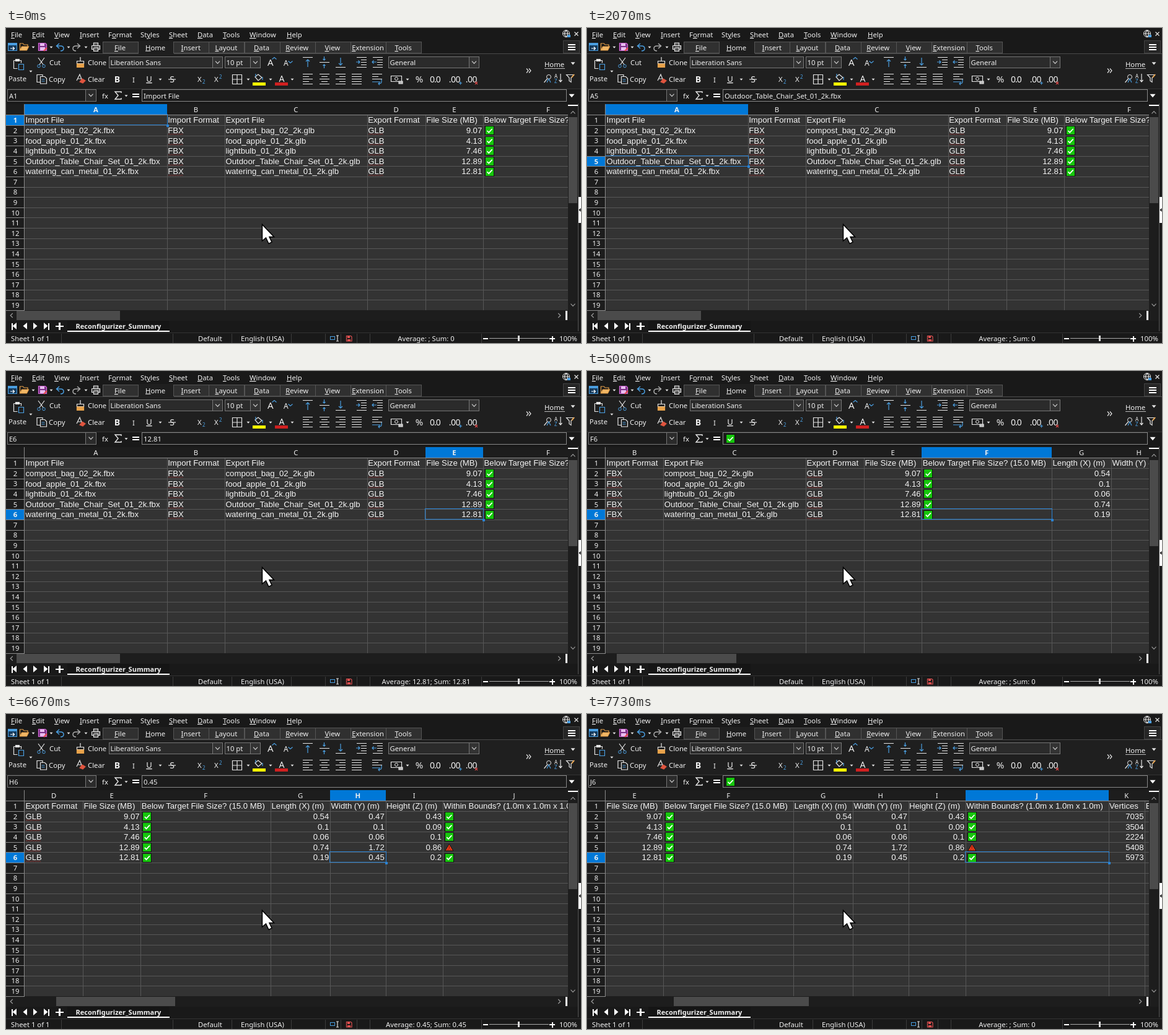
Write an HTML page that moves like this. It is 928x509 px and loops after 8 s.

```html
<!DOCTYPE html>
<html lang="en">
<head>
<meta charset="utf-8">
<title>Spreadsheet</title>
<style>
html, body { margin: 0; width: 100%; height: 100%; overflow: hidden; background: #191919; }
svg { display: block; width: 928px; height: 509px; }
text { font: 11.3px "Noto Sans", "Open Sans", sans-serif; fill: #f0f0f0; white-space: pre; }
.cell { font: 13.2px "Liberation Sans", Arial, sans-serif; fill: #f4f4f4; }
.bold { font-weight: 700; }
.mid { text-anchor: middle; }
.end { text-anchor: end; }
rect, line { shape-rendering: crispEdges; }
</style>
</head>
<body>
<svg id="stage" viewBox="0 0 928 509">
  <defs><clipPath id="clip"><rect x="30" y="122" width="877" height="334"/></clipPath></defs>
  <g id="chrome"></g>
  <g id="sheet"></g>
  <g id="pointer"></g>
</svg>
<script>
const BLUE = '#0078d7', SKY = '#4a9ee0', INK = '#e4e4e4', GRID = '#575757', EDGE = '#8a8a8a', BG = '#191919';

// Drawing helpers, each returns SVG markup
const rect = (x, y, w, h, fill, stroke = 'none') =>
  `<rect x="${x}" y="${y}" width="${w}" height="${h}" fill="${fill}" stroke="${stroke}"/>`;
const path = (d, stroke = INK, fill = 'none', w = 1.2) =>
  `<path d="${d}" stroke="${stroke}" fill="${fill}" stroke-width="${w}"/>`;
const line = (x1, y1, x2, y2, stroke) =>
  `<line x1="${x1}" y1="${y1}" x2="${x2}" y2="${y2}" stroke="${stroke}"/>`;
const text = (x, y, s, cls = '', style = '') =>
  `<text x="${x}" y="${y}" class="${cls}" style="${style}">${s}</text>`;
const mnemonic = s => s.replace(/_(.)/, '<tspan text-decoration="underline">$1</tspan>');
const drop = (x, y, r = 2.5, fill = INK) => path(`M${x - r} ${y - r / 2}h${2 * r}l${-r} ${r * 1.2}z`, 'none', fill);
const chevron = (x, y, dx, dy, c = '#999') => dx
  ? path(`M${x - dx} ${y - 3.5}L${x + dx} ${y}L${x - dx} ${y + 3.5}`, c)
  : path(`M${x - 3.5} ${y - dy}L${x} ${y + dy}L${x + 3.5} ${y - dy}`, c);
const bars = (x, y, widths, align) => widths.map((w, i) =>
  rect(x + (16 - w) * align, y + i * 4, w, 1.3, INK)).join('');
const combo = (x, w, label) => rect(x + .5, 46.5, w, 18, '#2b2b2b', '#777') +
  rect(x + w - 15.5, 46.5, 16, 18, '#333', '#777') + chevron(x + w - 7.5, 55.5, 0, 1.8, '#ccc') + text(x + 2.5, 59.5, label);

function tick(x, y) {
  return `<rect x="${x - 7}" y="${y - 7}" width="14" height="14" fill="#16c60c" stroke="#111"/>` +
    path(`M${x - 4} ${y + .3}l2.7 2.8l5.4 -5.8`, '#fff', 'none', 1.7);
}
const warn = (x, y) => path(`M${x} ${y - 5.5}L${x + 6.5} ${y + 5.5}h-13z`, '#111', '#f03a17', 1) +
  path(`M${x} ${y - 2}v4M${x - 2.5} ${y + 3.4}h1.4M${x + 1.2} ${y + 3.4}h1.4`, '#7a1c0c');

function menus() {
  const items = [[8, '_File'], [42, '_Edit'], [78, '_View'], [119, '_Insert'], [165, 'F_ormat'], [217, 'St_yles'],
    [263, '_Sheet'], [309, '_Data'], [350, '_Tools'], [393, '_Window'], [453, '_Help']];
  const tabs = ['_File', '_Home', '_Insert', '_Layout', '_Data', '_Review', '_View', '_Extension', '_Tools'];
  let s = items.map(([x, t]) => text(x, 15, mnemonic(t))).join('');
  s += rect(0, 41, 928, 58, '#1f1f1f') + line(0, 41.5, 928, 41.5, '#4a4a4a');
  tabs.forEach((t, i) => {
    const x = 156.5 + i * 57.15, on = i == 1;
    s += rect(x, on ? 20.5 : 22.5, 57, on ? 22 : 18, on ? '#1f1f1f' : '#303030', on ? 'none' : '#555') +
      text(x + 27.5, on ? 35.5 : 36, mnemonic(t), 'mid');
  });
  s += rect(899.5, 20.5, 26, 20, '#262626', '#444') + [26, 30, 34].map(y => rect(907, y, 12, 1.6, '#fff')).join('');
  // Globe and close
  s += `<circle cx="904" cy="9" r="5.5" fill="none" stroke="${INK}"/>` + path('M898.5 9h11M904 3.5q-5 5.5 0 11q5 -5.5 0 -11') +
    rect(906, 11, 5, 4, SKY) + path('M917.5 6.5l6 6m0 -6l-6 6');
  return s;
}

function quickBar() {
  return rect(3.5, 24.5, 14, 12, '#153a5c', SKY) + rect(4, 25, 14, 3, SKY) + path('M7 33h6m-2 -2.5l2.5 2.5l-2.5 2.5', '#fff') +
    path('M22.5 36V25h5l1.5 2h6v3', '#e8a24a') + path('M22.5 36l3 -6h11l-3 6z', '#e8a24a', '#f0b766') +
    path('M52.5 24.5h11l2 2v10h-13z', '#d56ad8', '#7a2f86') + rect(55, 25, 7, 4, '#e9bdf0') + rect(55, 31, 8, 5, '#e9bdf0') + path('M61 37l5 -5', '#f05050', 'none', 2) +
    path('M86 25l-4.5 4l4.5 4M82 29h6q5 0 5 4t-5 4', SKY, 'none', 1.5) +
    path('M115 25l4.5 4l-4.5 4M119 29h-6q-5 0 -5 4t5 4', '#aaa', 'none', 1.5) +
    path('M141.5 28v-4h7v4M138.5 28.5h13v6h-2.500M138.500 28.500v6h2.500M141.500 32h7v5.500h-7z', INK, '#555') +
    [44, 73, 101, 129].map(x => drop(x, 31)).join('');
}

function toolbar() {
  let s = '';
  // Clipboard
  s += path('M12.500 52.500h12v4M12.500 52.500v13h6') + rect(15, 50, 7, 4, INK) + path('M20.500 58.500h8v9h-8z', SKY, '#1f1f1f') +
    text(4, 86, 'Paste') + drop(40, 70) +
    path('M52 48l8 11M62 48l-8 11') + `<circle cx="53" cy="61.500" r="2.300" fill="none" stroke="${SKY}"/><circle cx="61" cy="61.500" r="2.300" fill="none" stroke="${SKY}"/>` +
    text(70, 60, 'Cut') + path('M58 87.500h-8v-12h9v3', INK) + path('M55.500 78.500h7l3 3v8.500h-10z', INK, '#1f1f1f') + path('M57.500 83h5M57.500 86h5', SKY) +
    text(69, 87, 'Copy') +
    path('M120 47v6M114.500 53.500h11v4h-11z', INK) + path('M114.500 57.500v6h11v-6', '#e8a24a', '#e8a24a') + text(132, 60, 'Clone') +
    path('M114 85l5 -10l4 10M115.500 82h6', INK) + path('M119 87l4 -5l5 3l-4 4z', '#e0553f', '#e0553f') + text(132, 87, 'Clear');
  s += combo(166, 183, 'Liberation Sans') + combo(353, 57, '10 pt') + combo(617, 146, 'General');
  // Character formatting
  s += text(422, 61, 'A', '', 'font-size:15px') + chevron(433, 49, 0, -1.5, SKY) + text(448, 61, 'A', '', 'font-size:12px') + chevron(459, 55, 0, 1.5, SKY) +
    text(179.500, 88, 'B', 'bold mid', 'font-size:14px') + text(206, 88, 'I', 'mid', 'font:italic 14px "Noto Serif",serif') +
    text(231, 87, 'U', 'mid', 'font-size:13px;text-decoration:underline') + drop(249, 83) +
    text(268, 88, 'S', 'mid', 'font-size:14px') + path('M262 83h12') +
    text(309, 87, 'X') + text(317, 90, '2', '', 'font-size:8px;fill:' + SKY) + text(336, 87, 'X') + text(344, 82, '2', '', 'font-size:8px;fill:' + SKY) +
    path('M365.500 75.500h15v15h-15zM373 75.500v15M365.500 83h15') +
    path('M402 79l5 -4l6 5l-6 5z', INK) + path('M403 74v5M414 79v5', SKY) + rect(398, 88, 21, 4.500, '#ffff00') +
    text(445, 87, 'A', 'mid', 'font-size:14px') + rect(434, 88, 21, 4.500, '#d02020') +
    [391, 427, 462, 648].map(x => drop(x, 83)).join('');
  // Alignment
  s += bars(479, 47, [16], 0) + path('M487 63v-12m-3 3l3 -3l3 3', SKY) + bars(482, 51, [0], 0) +
    bars(506, 55, [16], 0) + path('M513.500 46v6m-2 -2l2 2l2 -2M513.500 65v-6m-2 2l2 -2l2 2', SKY) +
    bars(532, 63, [16], 0) + path('M540 48v12m-3 -3l3 3l3 -3', SKY) +
    bars(566, 47, [16, 9, 9, 9, 16], 1) + path('M565 55h6m-2.500 -2.500l2.500 2.500l-2.500 2.500', SKY) +
    bars(592, 47, [16, 9, 9, 9, 16], 1) + path('M598 55h-7m2.500 -2.500l-2.500 2.500l2.500 2.500', SKY) +
    bars(479, 74, [16, 10, 16, 10, 16], 0) + bars(506, 74, [16, 10, 16, 10, 16], .5) + bars(532, 74, [16, 10, 16, 10, 16], 1) +
    bars(558, 74, [16, 16, 16, 16, 16], 0) + bars(591, 74, [16, 10, 16], 0) + path('M591 87h13m2 -4v4q0 3 -5 3m2 -2l-2 2l2 2', SKY);
  // Number formats
  s += path('M621.500 77.500h17v9h-17z') + `<circle cx="630" cy="82" r="2.500" fill="none" stroke="${INK}"/>` + path('M634 86h6v4h-6z', INK, '#bbb') +
    text(667, 88, '%', 'mid', 'font-size:15px') + text(692.500, 88, '0.0', 'mid', 'font-size:14px;letter-spacing:-1px') +
    text(724, 88, '.00', 'mid', 'font-size:14px;letter-spacing:-.5px') + text(751, 88, '.00', 'mid', 'font-size:14px;letter-spacing:-.5px') +
    path('M731 89h5m-2.500 -2.500v5', SKY) + path('M757 87l4 4m0 -4l-4 4', '#e04848') +
    path('M840 65.500l3 3.500l-3 3.500M844 65.500l3 3.500l-3 3.500') + text(869, 63, 'Home') + rect(869, 65, 33, 1, '#bbb') + drop(915, 57, 3.500);
  // Find, sort, filter
  s += `<circle cx="876" cy="79" r="3.500" fill="none" stroke="${INK}"/>` + path('M873.500 82l-5 6') + path('M873 88l3 -6l3 6', SKY) +
    text(885, 81, 'A', '', 'font-size:8px') + text(885, 89, 'Z', '', 'font-size:8px;fill:' + SKY) + path('M895 74v13m-2.500 -3l2.500 3l2.500 -3') +
    path('M904.500 75.500h12l-4.500 5v7l-3 -2v-5z') + path('M913 80l4 -5', '#e8a24a', 'none', 2);
  // Formula bar
  s += line(0, 98.500, 928, 98.500, '#333') + rect(2.500, 99.500, 143, 19, '#1c1c1c', '#777') + rect(128.500, 99.500, 17, 19, '#2b2b2b', '#777') + chevron(137, 108.500, 0, 1.800, '#ccc') +
    text(155, 114, 'fx', '', `font:italic 15px "Noto Serif",serif;fill:${SKY}`) + path('M186 105v-2h-10l5 6l-5 6h10v-2', INK, 'none', 1.400) + drop(194, 109.500) +
    rect(204, 106, 11, 1.800, '#fff') + rect(204, 110, 11, 1.800, '#fff') +
    rect(219.500, 99.500, 685, 19, '#1c1c1c', '#888') + drop(913, 109, 4.500, '#fff');
  return s;
}

function bottomBar() {
  let s = rect(0, 456, 924, 17, '#1d1d1d') + chevron(9, 464.500, -1.800) + chevron(893, 464.500, 1.800) + rect(903, 457, 3, 15, '#fff');
  // Vertical scroll bar and side handle
  s += rect(907, 122, 17, 334, '#1d1d1d') + rect(907, 124, 16, 2, '#fff') + chevron(915, 136.500, 0, -1.800) +
    chevron(915, 447.500, 0, 1.800) + rect(908, 144, 14, 139, '#4b4b4b') + line(923.500, 122, 923.500, 490, '#555') +
    rect(924, 273, 4, 42, '#fff') + path('M927.500 291v6l-3 -3z', 'none', '#000');
  // Sheet tabs
  const y = 481.5;
  s += rect(9, y - 5, 1.800, 11, '#fff') + [[17, -1], [34, -1], [44, 1], [61, 1]].map(([x, d]) =>
    path(`M${x} ${y - 5.500}v11l${6.500 * d} -5.500z`, 'none', '#fff')).join('') + rect(68, y - 5, 1.800, 11, '#fff') +
    rect(80, y - 1, 13, 2.500, '#fff') + rect(85, y - 6, 2.500, 12, '#fff') +
    rect(99, 473, 165, 17, '#151515') + text(181.500, 486, 'Reconfigurizer_Summary', 'bold mid', 'font-size:11px') + rect(99, 489, 165, 2, '#fff');
  // Status bar
  s += line(0, 492.500, 928, 492.500, '#333') + [89, 269, 364, 460, 515, 540, 566, 587, 767].map(x => line(x + .5, 494, x + .5, 509, '#3c3c3c')).join('') +
    text(8, 506, 'Sheet 1 of 1') + text(310, 506, 'Default') + text(379, 506, 'English (USA)') +
    rect(523.500, 498.500, 7, 5, 'none', SKY) + path('M533 497h4M535 497v9M533 506h4') +
    path('M549.500 497.500h7l1.500 1.500v7h-8.500z', '#e05050') + rect(551, 498, 4, 3, '#e05050') + rect(551, 503, 5, 3, '#e05050') +
    rect(770, 501, 8, 2, '#fff') + rect(780, 501, 96, 1, '#aaa') + rect(826, 497, 3, 9, '#ddd') +
    rect(877, 501, 9, 2, '#fff') + rect(880.500, 497.500, 2, 9, '#fff') + text(893, 506, '100%');
  return s;
}

// Sheet contents
const models = ['compost_bag_02_2k', 'food_apple_01_2k', 'lightbulb_01_2k', 'Outdoor_Table_Chair_Set_01_2k', 'watering_can_metal_01_2k'];
const rep = v => Array(5).fill(v);
const cols = [
  [229.7, 'Import File', models.map(m => m + '.fbx')],
  [93.3, 'Import Format', rep('FBX')],
  [229.7, 'Export File', models.map(m => m + '.glb')],
  [94, 'Export Format', rep('GLB')],
  [93.3, 'File Size (MB)', ['9.07', '4.13', '7.46', '12.89', '12.81']],
  [209.7, 'Below Target File Size? (15.0 MB)', rep(tick)],
  [96, 'Length (X) (m)', ['0.54', '0.1', '0.06', '0.74', '0.19']],
  [89.5, 'Width (Y) (m)', ['0.47', '0.1', '0.06', '1.72', '0.45']],
  [92.3, 'Height (Z) (m)', ['0.43', '0.09', '0.1', '0.86', '0.2']],
  [230.7, 'Within Bounds? (1.0m x 1.0m x 1.0m)', [tick, tick, tick, warn, tick]],
  [58.7, 'Vertices', ['7035', '3504', '2224', '5408', '5973']],
  [60, 'Edges', rep('')]
];
const rowY = r => 140.4 + 16.6 * (r - 1);   // top of row r
const px = v => Math.round(v) + .5;

// Timelines: [start ms, value]
const picks = [[0, 'A1'], [870, 'A2'], [1330, 'A3'], [1670, 'A4'], [2070, 'A5'], [2470, 'A6'], [3130, 'B6'], [3400, 'C6'],
  [3800, 'D6'], [4200, 'E6'], [4670, 'F6'], [5330, 'G6'], [6070, 'G6'], [6200, 'H6'], [6730, 'I6'], [7530, 'J6']];
const scrolls = [[0, 0], [4530, 1], [6070, 2], [6670, 3], [7400, 4]];
const sums = [[0, ''], [4470, '12.81'], [5000, ''], [5600, '0.19'], [6400, '0.45'], [7000, '0.2'], [7730, '']];
const thumbs = [[17, 167], [48, 193], [81, 192], [112, 193], [140, 218]];
const at = (list, t) => list.filter(e => e[0] <= t).pop();

function drawSheet(first, name, thumb, sum) {
  const col = name.charCodeAt(0) - 65, row = +name[1];
  let s = rect(30, 140, 877, 316, '#333'), head = '', box = '', x = 30;
  for (let r = 1; r <= 19; r++) s += line(30, px(rowY(r + 1)), 907, px(rowY(r + 1)), GRID);
  for (let c = first; c < cols.length && x < 907; c++) {
    const [w, title, vals] = cols[c], on = c == col, right = x + w;
    s += line(px(right), 141, px(right), 456, GRID) + text(x + 1.5, 153.3, title, 'cell');
    vals.forEach((v, i) => {
      const base = rowY(i + 2) + 12.9;
      if (typeof v == 'function') s += v(x + 10.5, base - 4.2);
      else if (/^\d/.test(v)) s += text(right - 1.7, base, v, 'cell end');
      else s += text(x + 1.5, base, v, 'cell');
      if (c == 1 || c == 3) s += path(`M${x + 2} ${base + 2.5}` + 'l2 -1.5l2 1.5'.repeat(6), '#a33434', 'none', .7);
    });
    head += rect(x, 123, w, 17, on ? BLUE : '#1d1d1d') + line(px(right), 123, px(right), 140, EDGE) +
      text(x + w / 2, 136.3, String.fromCharCode(65 + c), on ? 'mid bold' : 'mid');
    if (on) box = rect(px(x) - 1, px(rowY(row)) - 1, Math.round(w) + 1, 17, 'none', '#2a83d4') +
      rect(px(right) - 2, px(rowY(row + 1)) - 2, 4, 4, '#2a83d4');
    x = right;
  }
  s = `<g clip-path="url(#clip)">${s}${head}${line(30, 140.5, 907, 140.5, EDGE)}${box}</g>`;
  s += rect(0, 123, 30, 333, '#1d1d1d') + line(0, 140.5, 30, 140.5, EDGE);
  for (let r = 1; r <= 19; r++) {
    const y = rowY(r), on = r == row;
    if (on) s += rect(0, px(y) + .5, 30, 16, BLUE);
    s += line(0, px(y + 16.6), 30, px(y + 16.6), EDGE) + text(15, y + 12.8, r, on ? 'mid bold' : 'mid');
  }
  s += line(29.5, 123, 29.5, 456, EDGE);
  const [tx, tw] = thumbs[thumb], value = row == 1 ? cols[col][1] : cols[col][2][row - 2];
  s += rect(tx, 457, tw, 15, '#4b4b4b') + text(5, 113.5, name, '', 'font-size:11px') +
    (typeof value == 'function' ? value(231.5, 109.5) : text(222, 113.5, value)) +
    text(678, 506, `Average: ${sum}; Sum: ${sum || 0}`, 'mid');
  return s;
}

const $ = id => document.getElementById(id);
$('chrome').innerHTML = rect(0, 0, 928, 509, BG) + menus() + quickBar() + toolbar() + bottomBar();
$('pointer').innerHTML = path('M413.5 317.500v26.500l6 -5l4.500 9.500l5 -2.500l-4 -8.500h7.500z', '#000', '#fff', 1.5);

let shown = '';
function frame() {
  const t = performance.now() % 8000;
  const [picked, name] = at(picks, t);
  // The scroll thumb catches up only when the selection moves
  const thumb = name == 'G6' ? 1 : at(scrolls, picked)[1];
  const state = [at(scrolls, t)[1], name, thumb, at(sums, t)[1]];
  if (state.join() != shown) {
    shown = state.join();
    $('sheet').innerHTML = drawSheet(...state);
  }
  requestAnimationFrame(frame);
}
frame();
</script>
</body>
</html>
```
